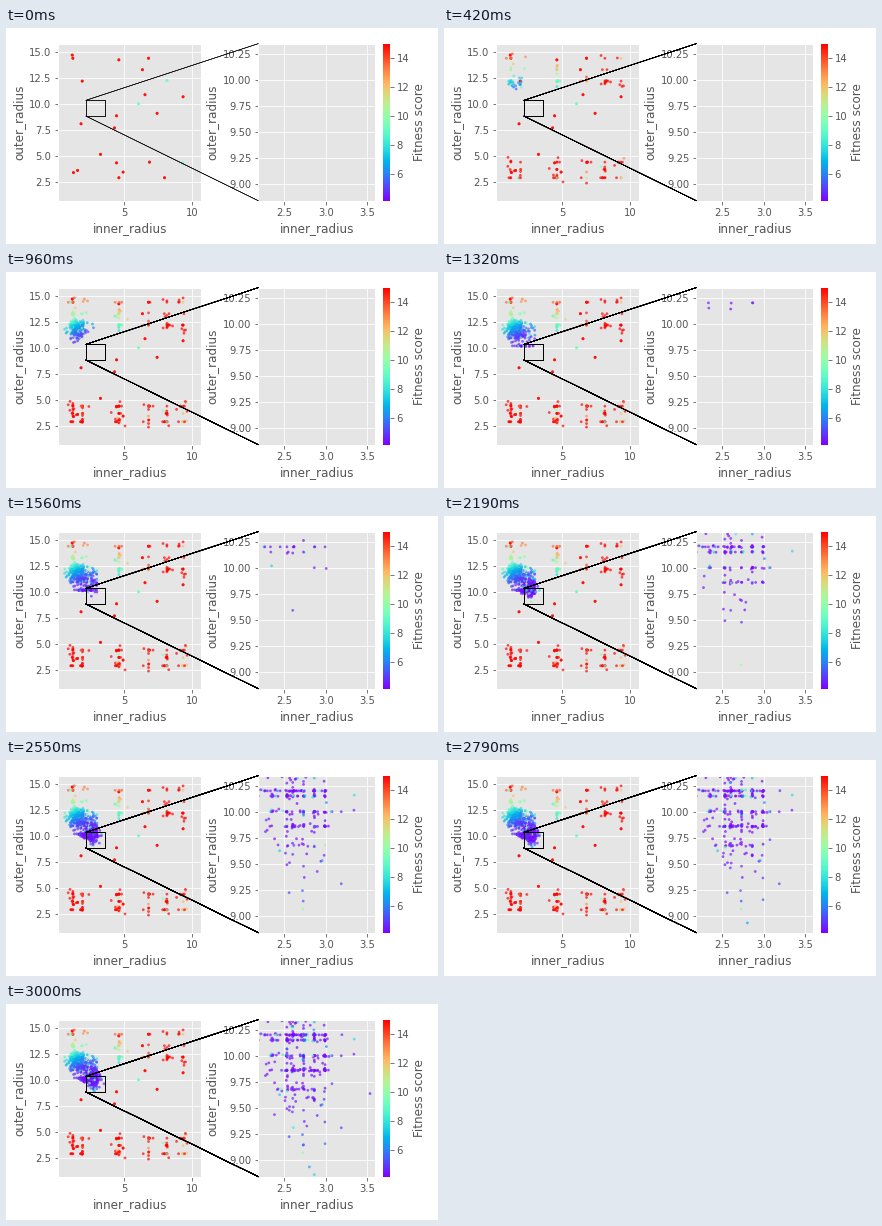
Recreate the animation shown at these times as a matplotlib script. Size 432x216 px, loop 3.03 s.

```python
import numpy as np
import matplotlib.pyplot as plt
from matplotlib.animation import FuncAnimation
from matplotlib.cm import ScalarMappable
from matplotlib.collections import LineCollection
from matplotlib.colors import Normalize

W, H, DPI = 432, 216, 72
FRAMES, INTERVAL = 101, 30
BEST, WORST = 4.14, 15.0

# Genes shared by the coarse search, then by the refined one
COLS = [1.24, 1.24, 1.95, 4.62, 4.62, 6.8, 8.15, 9.34]
ROWS = [2.9, 3.7, 4.4, 12.2, 12.2, 13.3, 14.4]
FINE_COLS = [2.53, 2.6, 2.73, 2.86, 2.99]
FINE_ROWS = [10.2, 10.15, 10.0, 9.86, 9.68]
STRAYS = [(1.84, 8.09), (4.3, 7.7), (4.45, 8.86), (7.43, 9.1),
          (9.34, 10.69), (6.07, 10.02), (6.54, 10.89), (3.27, 5.15)]

rng = np.random.default_rng(8)
plt.style.use("ggplot")


def mutate(genes, prob, sigma):
    hit = rng.random(len(genes)) < prob
    return genes + hit * rng.normal(0, sigma, len(genes))


def cross(n):
    """Coarse search: any column meets any row, sometimes mutated."""
    return (mutate(rng.choice(COLS, n), .5, .2),
            mutate(rng.choice(ROWS, n), .5, .28))


def fitness(x, y):
    """A smooth bowl around the optimum, with some noisy trials."""
    depth = np.where(y < 9.8, 1.4, 4)
    r2 = ((x - 2.6) / 3.6) ** 2 + ((y - 9.8) / depth) ** 2
    score = 14.9 - 10.7 * np.exp(-r2 ** 1.5)
    score += rng.exponential(.15, len(x))
    noisy = rng.random(len(x)) < .14
    return np.where(noisy, .3 * score + .7 * rng.uniform(6, 13, len(x)), score)


def first_generation():
    x, y = np.c_[np.transpose(STRAYS), cross(15)]
    score = np.where(np.arange(len(x)) % 6 == 5, 9.3, 14.8)
    group = np.c_[np.zeros(len(x)), x, y, score]
    return np.repeat(group, 3, axis=0)


def coarse_search(n):
    birth = 1 + 27 * rng.random(n) ** 1.3
    x, y = cross(n)
    return np.c_[birth, x, y, fitness(x, y)]


def refined_search(n):
    """A swarm drifting to the optimum while good genes take over."""
    birth = np.sort(rng.uniform(13, FRAMES, n))
    keys = [14, 34, 45, 60, 85, 101]
    cx = np.interp(birth, keys, [1.5, 1.55, 2.1, 2.5, 2.65, 2.72])
    cy = np.interp(birth, keys, [11.9, 11.7, 11.1, 10.4, 10.0, 9.75])
    x = cx + .24 * rng.standard_t(5, n)
    y = cy + rng.normal(0, .42, n)

    share = np.interp(birth, [33, 45, 62, 101], [0, .35, .6, .45])
    known = np.interp(birth, [38, 60, 85], [1, 4, 5])
    row = (rng.random(n) * known).astype(int)
    x = np.where(rng.random(n) < share, rng.choice(FINE_COLS, n), x)
    y = np.where(rng.random(n) < share, np.take(FINE_ROWS, row), y)
    x, y = mutate(x, .5, .008), mutate(y, .5, .008)
    return np.c_[birth, x, y, fitness(x, y)]


pop = np.vstack([first_generation(), coarse_search(235), refined_search(850)])
pop = pop[np.argsort(pop[:, 0], kind="stable")]
birth, xy, score = pop[:, 0], pop[:, 1:3], pop[:, 3]

fig = plt.figure(figsize=(W / DPI, H / DPI), dpi=DPI, facecolor="white")
norm = Normalize(BEST, WORST)


def panel(left, width):
    return fig.add_axes([left / W, 43.2 / H, width / W, 157.2 / H])


def scatter_panel(left, width, xlim, ylim):
    ax = panel(left, width)
    dots = ax.scatter([], [], s=3.5, c=[], linewidths=1, alpha=.55,
                      cmap="rainbow", norm=norm)
    ax.set(xlim=xlim, ylim=ylim, xlabel="inner_radius", ylabel="outer_radius")
    return ax, dots


main, main_dots = scatter_panel(52.45, 143, (.18, 10.69), (.68, 15.81))
zoom, zoom_dots = scatter_panel(252.45, 117, (2.187, 3.597), (8.84, 10.346))
main.set_xticks([5, 10])
main.set_yticks(np.arange(2.5, 15.1, 2.5))
zoom.set_xticks([2.5, 3, 3.5])
zoom.set_yticks(np.arange(9, 10.3, .25))

bar = fig.colorbar(ScalarMappable(norm, "rainbow"), cax=panel(376.6, 7),
                   ticks=range(6, 15, 2), label="Fitness score")
bar.outline.set_visible(False)

# Zoom window and its connectors, in figure coordinates
to_fig = fig.transFigure.inverted().transform
(x0, x1), (y0, y1) = zoom.get_xlim(), zoom.get_ylim()
box = to_fig(main.transData.transform(
    [(x0, y0), (x1, y0), (x1, y1), (x0, y1), (x0, y0)]))
low, high = to_fig(zoom.transAxes.transform([(0, 0), (0, 1)]))
marks = [box, np.array([box[0], low]), np.array([box[3], high])]
inset_lines = LineCollection([], colors="black", linewidths=.5,
                             transform=fig.transFigure, zorder=5)
fig.add_artist(inset_lines)


def update(i):
    n = np.searchsorted(birth, i, side="right")
    for dots in (main_dots, zoom_dots):
        dots.set_offsets(xy[:n])
        dots.set_array(score[:n])
    # Overdrawing makes the antialiased lines grow heavier
    inset_lines.set_segments(marks * (i + 3))
    return main_dots, zoom_dots, inset_lines


anim = FuncAnimation(fig, update, frames=FRAMES, interval=INTERVAL,
                     repeat=True, blit=False)
plt.show()
```
